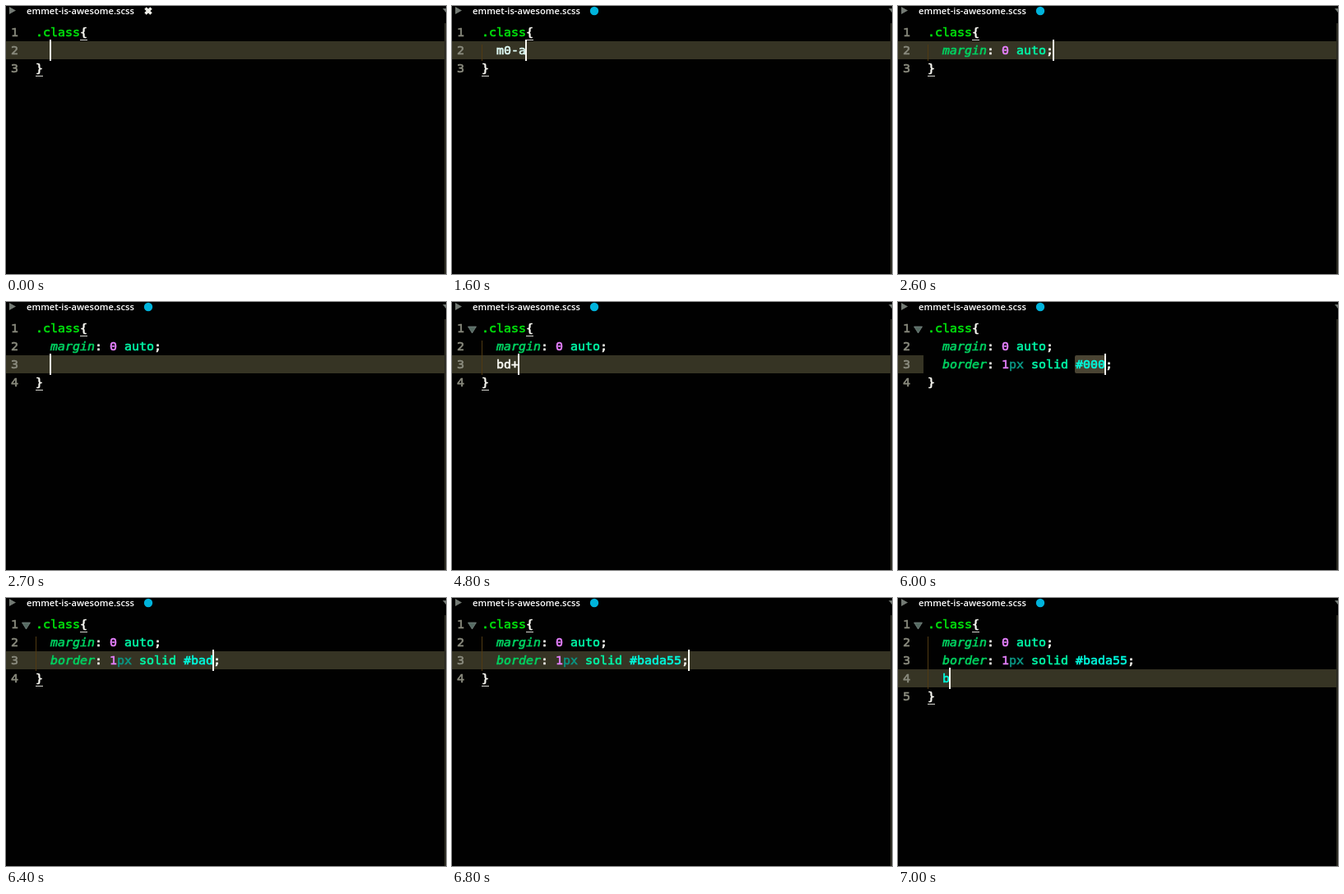
Write an HTML page that moves like this. It is 535 by 327 pixels and loops after 8 s.

```html
<!DOCTYPE html>
<html lang="en">
<head>
<meta charset="utf-8">
<title>Abbreviation typing</title>
<style>
  html, body { margin: 0; width: 100%; height: 100%; overflow: hidden; background: #010101; }
  svg { display: block; width: 535px; height: 327px; }
  .code { font: 14.95px "DejaVu Sans Mono", monospace; stroke-width: .65px; }
  .tab { font: 600 11.2px "Open Sans", sans-serif; fill: #fff; }
</style>
</head>
<body>
<svg viewBox="0 0 535 327">
  <rect x="533" y="21" width="2" height="306" fill="#2c2b22"/>
  <path d="M4 1L12 5.5L4 10Z" fill="#737a74"/>
  <path d="M531 3H535V8Z" fill="#737a74"/>
  <text class="tab" x="25" y="10">emmet-is-awesome.scss</text>
  <path id="close" d="M169.5 2.5L176.5 9.5M176.5 2.5L169.5 9.5" stroke="#f0f0ea" stroke-width="3.4"/>
  <circle id="dirty" cx="173" cy="6" r="5.2" fill="#00b4dc"/>
  <g id="editor" class="code"></g>
</svg>
<script>
const DURATION = 8000, LEFT = 36, CELL = 9, ROW = 22;
const WHITE = '#f8f8f2', CYAN = '#00f8dc';
const margin = 'margin: 0 auto;';
const border = rest => [margin, 'border: ' + rest];

// Each edit: start time, then the rule's body. "|" is the caret, "[...]" a selection.
const edits = [
  [0, '|'], [100, 'm|'], [600, 'm0|'], [1100, 'm0-|'], [1600, 'm0-a|'],
  [2600, margin + '|'], [2700, margin, '|'],
  [2800, margin, 'b|'], [3800, margin, 'bd|'], [4800, margin, 'bd+|'],
  [5800, ...border('[1px] solid #000;')],
  [5900, ...border('1px [solid] #000;')],
  [6000, ...border('1px solid [#000];')],
  ...[...'#bada55'].map((_, i) =>
    [6100 + i * 100, ...border(`1px solid ${'#bada55'.slice(0, i + 1)}|;`)]),
  [6800, ...border('1px solid #bada55;|')],
  [6900, ...border('1px solid #bada55;'), '|'],
  [7000, ...border('1px solid #bada55;'), 'b|']
];

const columnX = column => LEFT + column * CELL;
const rect = (x, y, w, h, fill, rx = 0) =>
  `<rect x="${x}" y="${y}" width="${w}" height="${h}" rx="${rx}" fill="${fill}"/>`;
const text = (x, row, content, color, italic = false) =>
  `<text x="${x}" y="${row * ROW + 15}" fill="${color}" stroke="${color}"` +
  `${italic ? ' font-style="italic"' : ''}>${content}</text>`;
const underline = (column, row) => rect(columnX(column), row * ROW + 19, CELL, 1, '#d8d8d2');

function tokenColor(token) {
  if (token[0] === '#') return CYAN;
  if (/^\d/.test(token)) return '#e680ff';
  if (token === 'px') return '#0a9482';
  return /\w/.test(token) ? '#00f4a6' : WHITE;
}

function codeLine(source, row) {
  if (!source.includes(':')) {
    const color = source === 'b' ? CYAN : source[0] === 'm' ? '#dcf8f2' : WHITE;
    return text(columnX(2), row, source, color);
  }
  return [...source.matchAll(/#\w*|\d+|[a-z]+|[:;]/g)].map(({ 0: token, index }) =>
    index === 0
      ? text(columnX(2), row, token, '#00d060', true)
      : text(columnX(2 + index), row, token, tokenColor(token))).join('');
}

function draw([time, ...body]) {
  const active = body.length + 1, closing = active + 1;
  const current = body[body.length - 1];
  const selectionStart = current.indexOf('[');
  const selecting = selectionStart >= 0;
  const caret = 2 + (selecting ? current.indexOf(']') - 1 : current.indexOf('|'));
  const top = active * ROW - 1;

  let out = rect(0, top, selecting ? 31 : 533, ROW, '#363424');
  if (selecting) {
    const start = columnX(2 + selectionStart);
    out += rect(start - 1, top, columnX(caret) - start + 1, ROW, '#4a4433', 2);
  } else {
    out += underline(6, 1) + underline(0, closing);
    if (current !== '|') out += rect(LEFT, 2 * ROW + 3, 1, body.length * ROW - 2, '#503a12');
  }

  for (let row = 1; row <= closing; row++) out += text(6, row, row, '#8a8b7e');
  if (time >= 2800)
    out += '<path d="M19.5 30H29.5L24.5 38Z" fill="#566b63" stroke="#87948e"/>';

  out += text(LEFT, 1, '.class', '#00e00c') + text(columnX(6), 1, '{', WHITE);
  body.forEach((source, i) => out += codeLine(source.replace(/[|[\]]/g, ''), i + 2));
  out += text(LEFT, closing, '}', WHITE);
  out += rect(columnX(caret) - 1, top - 2, 2, 26, '#f8f8f0');

  document.getElementById('editor').innerHTML = out;
  document.getElementById('close').style.display = time ? 'none' : '';
  document.getElementById('dirty').style.display = time ? '' : 'none';
}

const began = performance.now();
let shown;
function tick() {
  const time = (performance.now() - began) % DURATION;
  const edit = edits.findLast(([start]) => start <= time);
  if (edit !== shown) draw(shown = edit);
  requestAnimationFrame(tick);
}
tick();
</script>
</body>
</html>
```
